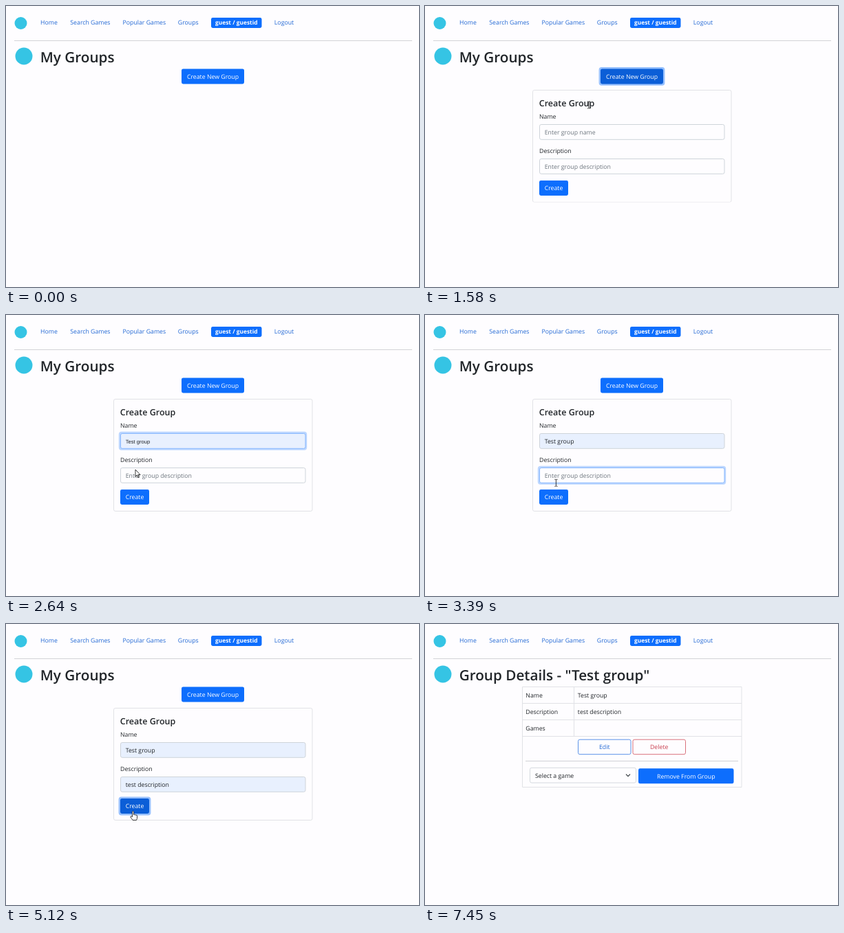
Write an HTML page with a canvas that moves like this. It is 600 by 409 pixels and loops after 8090 ms.

```html
<!DOCTYPE html>
<html lang="en">
<head>
<meta charset="utf-8">
<title>Groups</title>
<style>
  html, body { margin: 0; width: 100%; height: 100%; overflow: hidden; background: #fefdff; }
  canvas { display: block; }
</style>
</head>
<body>
<canvas id="stage" width="600" height="409"></canvas>
<script>
const ctx = document.getElementById('stage').getContext('2d');
const LOOP = 8090, DETAILS_AT = 5940;
const BG = '#fefdff', INK = '#212529', BLUE = '#0d6efd', LINK = '#2268d4';
const GRAY = '#6c757d', LINE = '#e1e2e6', RED = '#c9404f';
const SANS = '"Open Sans", "Noto Sans", sans-serif';
const ARIAL = '"Liberation Sans", Arial, sans-serif';

// Pointer path: time, x, y of the hot spot.
const path = [
  [60, 404, 21], [210, 300, 100], [1240, 300, 100], [1580, 238, 144], [1820, 190, 184],
  [1970, 190, 184], [2640, 188, 225], [2790, 188, 225], [3050, 190, 233], [3250, 190, 233],
  [3580, 191, 262], [3610, 191, 262], [4030, 192, 275], [4180, 192, 275], [4500, 190, 288],
  [4850, 184.5, 272.7], [6300, 184.5, 272.7], [6670, 533, 295]
];
// Pointer shape from each time on.
const shapes = [
  [0, null], [60, 'arrow'], [150, 'hand'], [1370, 'arrow'], [1550, 'beam'], [1600, 'arrow'],
  [1740, 'beam'], [2100, 'arrow'], [2960, 'beam'], [3400, 'arrow'], [4800, 'hand'],
  [5970, 'arrow'], [6670, null]
];

const arrow = new Path2D('M0 0V10.2L2.3 8.1 3.9 11.8 5.4 11.1 3.8 7.5H7Z');
const hand = new Path2D('M-1 8V.8a1 1 0 0 1 2 0V5q1-1 1.8.2 1-.7 1.7.4Q6 5 6 6.6V9.5Q6 11 5 12.8H-.4' +
  'Q-2 10.5-3.6 8.4-3.5 6.7-2.2 7.2Z');
const beam = new Path2D('M-2-5H-.6L0-4.4.6-5H2M0-4.4V4.4M-2 5H-.6L0 4.4.6 5H2');

const clamp = v => Math.min(1, Math.max(0, v));
const ramp = (t, start, length) => clamp((t - start) / length);
const fade = (t, on, off) => ramp(t, on, 150) * (1 - ramp(t, off, 150));
const mix = (a, b, p) => `rgb(${a.map((v, i) => v + (b[i] - v) * p)})`;

function text(str, x, y, { size = 8.75, color = INK, weight = 400, family = SANS, align = 'left' } = {}) {
  ctx.font = `${weight} ${size}px ${family}`;
  ctx.fillStyle = color;
  ctx.textAlign = align;
  ctx.fillText(str, x, y);
}

function box(x, y, w, h, fill, stroke, radius = 2.4) {
  ctx.beginPath();
  ctx.roundRect(x, y, w, h, radius);
  if (fill) { ctx.fillStyle = fill; ctx.fill(); }
  if (stroke) { ctx.strokeStyle = stroke; ctx.stroke(); }
}

function line(x1, y1, x2, y2, color = LINE) {
  ctx.strokeStyle = color;
  ctx.beginPath();
  ctx.moveTo(x1, y1);
  ctx.lineTo(x2, y2);
  ctx.stroke();
}

function disc(x, y, r) {
  ctx.fillStyle = '#35c4e4';
  ctx.beginPath();
  ctx.arc(x, y, r, 0, 7);
  ctx.fill();
}

function button(label, x, y, w, dark = 0, glow = 0) {
  if (glow) box(x - 2.4, y - 2.4, w + 4.8, 26.8, `rgba(49,132,253,${glow * .5})`, null, 4);
  box(x, y, w, 22, mix([13, 110, 253], [11, 94, 215], dark));
  text(label, x + w / 2, y + 14.3, { color: '#fff', align: 'center' });
}

function outlineButton(label, x, color, stroke) {
  box(x + .5, 168.2, 76.5, 21.5, null, stroke);
  text(label, x + 38.7, 182.3, { color, align: 'center' });
}

// A field shows its placeholder, then a small autofill preview, then the accepted value.
function field(t, y, placeholder, value, previewAt, acceptAt, glow) {
  if (glow) box(163.8, y - 2.2, 273.4, 27, `rgba(13,110,253,${glow * .27})`, null, 4);
  box(166.5, y + .5, 268.5, 21.8, t < previewAt ? BG : '#e8f0fe',
    mix([206, 212, 218], [134, 183, 254], glow));
  if (t < previewAt) text(placeholder, 173.7, y + 15, { color: GRAY });
  else if (t < acceptAt) text(value, 173.7, y + 15, { size: 7.6, family: ARIAL });
  else text(value, 173.7, y + 15);
}

function header(title) {
  disc(21.5, 25, 9);
  disc(26, 73, 12.5);
  [['Home', 50], ['Search Games', 93.3], ['Popular Games', 169.5], ['Groups', 249.8], ['Logout', 389.8]]
    .forEach(([label, x]) => text(label, x, 26.6, { color: LINK }));
  box(298, 17, 73.5, 15, BLUE);
  text('guest / guestid', 334.8, 27.4, { size: 8.4, weight: 700, color: '#fff', align: 'center' });
  line(12, 50.5, 590, 50.5, '#d3d3d7');
  text(title, 49.7, 82.2, { size: 20.7, weight: 600 });
}

function groupForm(t) {
  header('My Groups');
  button('Create New Group', 255, 91.4, 91, fade(t, 120, 1970), fade(t, 1030, 1970));

  const open = 1 - (1 - ramp(t, 1265, 350)) ** 2;
  if (!open) return;
  ctx.save();
  ctx.beginPath();
  ctx.rect(150, 120, 300, 2 + 165 * open);
  ctx.clip();
  box(156.5, 122.5, 288.5, 163, null, LINE);
  text('Create Group', 165.8, 145.8, { size: 12.5, weight: 600 });
  text('Name', 166, 164.2);
  field(t, 172, 'Enter group name', 'Test group', 2430, 2800, fade(t, 1970, 3120));
  text('Description', 166, 214.2);
  field(t, 222, 'Enter group description', 'test description', 3640, 4190, fade(t, 3120, 4820));
  const pressed = ramp(t, 4860, 180);
  button('Create', 166, 254, 42, pressed, pressed);
  ctx.restore();
}

function groupDetails() {
  header('Group Details - "Test group"');
  box(141.5, 91.5, 318.5, 146, null, LINE, 0);
  [['Name', 'Test group'], ['Description', 'test description'], ['Games', '']].forEach(([key, value], i) => {
    const y = 91.5 + 24 * i;
    text(key, 146.3, y + 15.2);
    text(value, 221.8, y + 15.2);
    line(141, y + 24, 460, y + 24);
  });
  line(216.5, 91, 216.5, 163);
  outlineButton('Edit', 222, LINK, '#5a92e8');
  outlineButton('Delete', 301.5, RED, '#d9707b');
  line(146, 199.5, 455, 199.5, '#d0d1d4');
  box(152.5, 209.3, 154, 21.8, null, '#d4d9de');
  text('Select a game', 160, 223.6);
  ctx.strokeStyle = '#343a40';
  ctx.lineWidth = 1.2;
  ctx.stroke(new Path2D('M292 218.6L295 221.6 298 218.6'));
  ctx.lineWidth = 1;
  button('Remove From Group', 310, 210.3, 138.5);
}

function pointer(t) {
  const shape = shapes.findLast(([at]) => t >= at)[1];
  if (!shape) return;
  const i = Math.max(1, path.findIndex(([at]) => at >= t));
  const [t0, x0, y0] = path[i - 1], [t1, x1, y1] = path[i];
  const p = ramp(t, t0, t1 - t0), eased = p * p * (3 - 2 * p);
  ctx.save();
  ctx.translate(x0 + (x1 - x0) * eased, y0 + (y1 - y0) * eased);
  ctx.strokeStyle = '#222';
  ctx.lineWidth = .9;
  ctx.fillStyle = '#fff';
  if (shape === 'beam') ctx.stroke(beam);
  else {
    const outline = shape === 'hand' ? hand : arrow;
    ctx.fill(outline);
    ctx.stroke(outline);
  }
  ctx.restore();
}

function draw(now) {
  const t = now % LOOP;
  ctx.textRendering = 'geometricPrecision';
  ctx.lineWidth = 1;
  ctx.fillStyle = BG;
  ctx.fillRect(0, 0, 600, 409);
  if (t < DETAILS_AT) groupForm(t);
  else groupDetails();
  pointer(t);
  requestAnimationFrame(draw);
}
requestAnimationFrame(draw);
</script>
</body>
</html>
```
